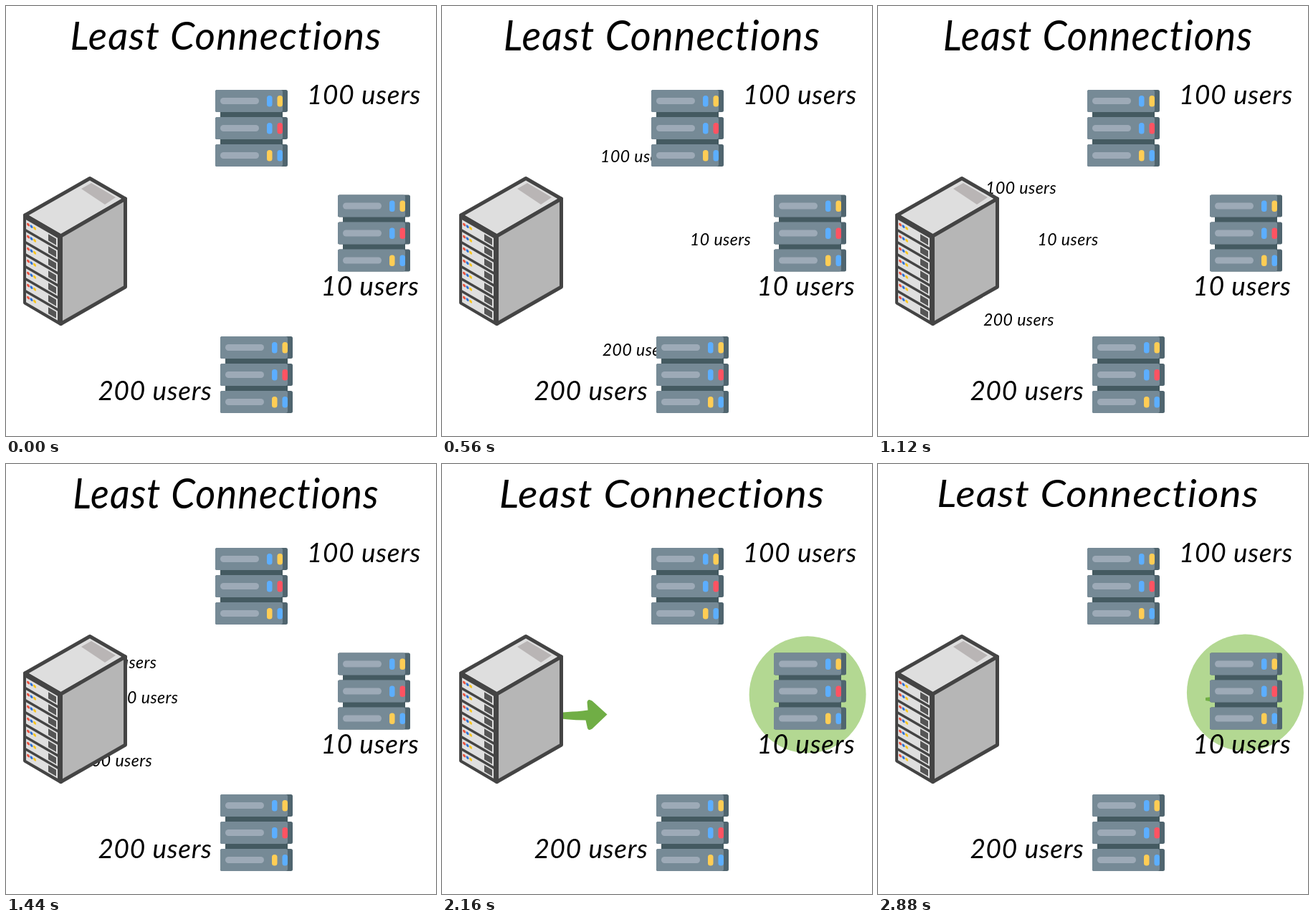
These frames come from a looping animation (600 by 600 pixels, 2960 ms). An HTML page:

```html
<!DOCTYPE html>
<html lang="en">
<head>
<meta charset="utf-8">
<title>Least Connections</title>
<style>
  html, body { margin: 0; height: 100%; overflow: hidden; background: #fff; }
  svg { display: block; width: 100%; height: 100%; }
  text { font: italic 37px Lato, sans-serif; letter-spacing: .02em; text-anchor: middle; }
  #title { font-size: 55px; }
  .message { font-size: 23px; }
</style>
</head>
<body>
<svg viewBox="0 0 600 600">
  <defs>
    <g id="row">
      <rect width="101" height="31" rx="2.5" fill="#50656f"/>
      <path d="M2.5 0H91Q94 0 94 3V28Q94 31 91 31H2.5Q0 31 0 28.5V2.5Q0 0 2.5 0Z" fill="#768a96"/>
      <rect x="7" y="11" width="54" height="9" rx="4.5" fill="#9daab7"/>
    </g>
    <g id="server">
      <path d="M7 30H94V77H7Z" fill="#445a61"/>
      <use href="#row"/><use href="#row" y="38"/><use href="#row" y="76"/>
      <g id="leds"></g>
    </g>
  </defs>

  <text id="title">Least Connections</text>
  <circle id="highlight" r="81.5" fill="#b3d892"/>
  <path id="arrow" fill="#70ae45" d="M252 341C270 338 285 339 306 336L305 325Q306 319 312 323L333 342L312 362Q306 366 305 359L303 350Q275 350 252 345Z"/>
  <g id="messages"></g>

  <use href="#server" x="292" y="117"/>
  <use href="#server" x="463" y="263.5"/>
  <use href="#server" x="299" y="461"/>
  <text x="499.5" y="137">100 users</text>
  <text x="508" y="404">10 users</text>
  <text x="208" y="550">200 users</text>

  <g stroke="#444" stroke-width="5" stroke-linejoin="round">
    <path d="M117 240.5L166.5 269L76.5 321L26.5 292Z" fill="#dedede"/>
    <path d="M166.5 269V392L76.5 443.5V321Z" fill="#b6b6b6"/>
    <path d="M26.5 292L76.5 321V443.5L26.5 414Z" fill="#444"/>
  </g>
  <path d="M105 255L119 247L153 267L138 277Z" fill="#b9b5b5"/>
  <g id="units" transform="matrix(1 .58 0 1 24 292)"></g>
</svg>
<script>
const FRAME = 80, LOOP = 2960, ARRIVAL = 1920, REPLY = 2400;
const $ = id => document.getElementById(id);

function add(parent, tag, attributes) {
  const node = document.createElementNS("http://www.w3.org/2000/svg", tag);
  for (const name in attributes) node.setAttribute(name, attributes[name]);
  return parent.appendChild(node);
}

const YELLOW = "#ffcd55", BLUE = "#5caeff", RED = "#ff5362";
[[BLUE, YELLOW], [BLUE, RED], [YELLOW, BLUE]].forEach((pair, row) =>
  pair.forEach((fill, i) =>
    add($("leds"), "rect", { x: 72 + i * 14.5, y: 8 + row * 38, width: 7.5, height: 15.5, rx: 3.5, fill })));

for (let v = 4; v < 120; v += 17) {
  add($("units"), "rect", { x: 4, y: v, width: 44, height: 13, fill: "#dfdfdf" });
  add($("units"), "rect", { x: 35, y: v + 2, width: 11, height: 9, fill: "#555" });
  ["#e8503c", "#2f6fd0", "#f8c51c"].forEach((fill, i) =>
    add($("units"), "circle", { cx: 7 + i * 4.5, cy: v + 5, r: 2, fill }));
}

// Each message runs from its server to the tower.
const messages = [
  { label: "100 users", from: [346, 172], to: [106, 319] },
  { label: "10 users", from: [520, 334], to: [102, 334] },
  { label: "200 users", from: [355, 534], to: [95, 389] },
];
for (const message of messages) {
  message.node = add($("messages"), "text", { class: "message" });
  message.node.textContent = message.label;
}

const wave = (t, peak, period) => Math.cos((t - peak) / period * 2 * Math.PI);
const show = (node, visible) => node.setAttribute("visibility", visible ? "visible" : "hidden");
const move = (node, x, y, more = "") => node.setAttribute("transform", `translate(${x} ${y}) ${more}`);

function draw(now) {
  const t = Math.floor(now % LOOP / FRAME) * FRAME;

  // The title wobbles wider as the loop goes on.
  const growth = (t / LOOP) ** 2;
  const sx = 1 + .035 * growth + (.015 + .042 * growth) * wave(t, 480, 1920);
  const sy = 1.01 + .045 * wave(t, 1000, 3400);
  move($("title"), 307, 41 + 20 * sy, `scale(${sx} ${sy})`);

  const k = t / ARRIVAL;
  const progress = k + .11 * k * (1 - k);
  for (const { node, from, to } of messages) {
    move(node, ...from.map((start, i) => start + (to[i] - start) * progress));
    show(node, t > 0 && t < ARRIVAL);
  }

  const travel = (t - REPLY) / 480;
  const angle = (202 + 228 * travel - 25 * travel ** 2) * Math.PI / 180;
  const radius = 5.4 - travel;
  move($("highlight"), 509.3 + radius * Math.cos(angle), 316 + radius * Math.sin(angle));
  show($("highlight"), t >= 1760);

  move($("arrow"), 205 * travel, -15 * travel);
  show($("arrow"), t >= ARRIVAL);

  requestAnimationFrame(() => draw(performance.now()));
}
draw(0);
</script>
</body>
</html>
```
